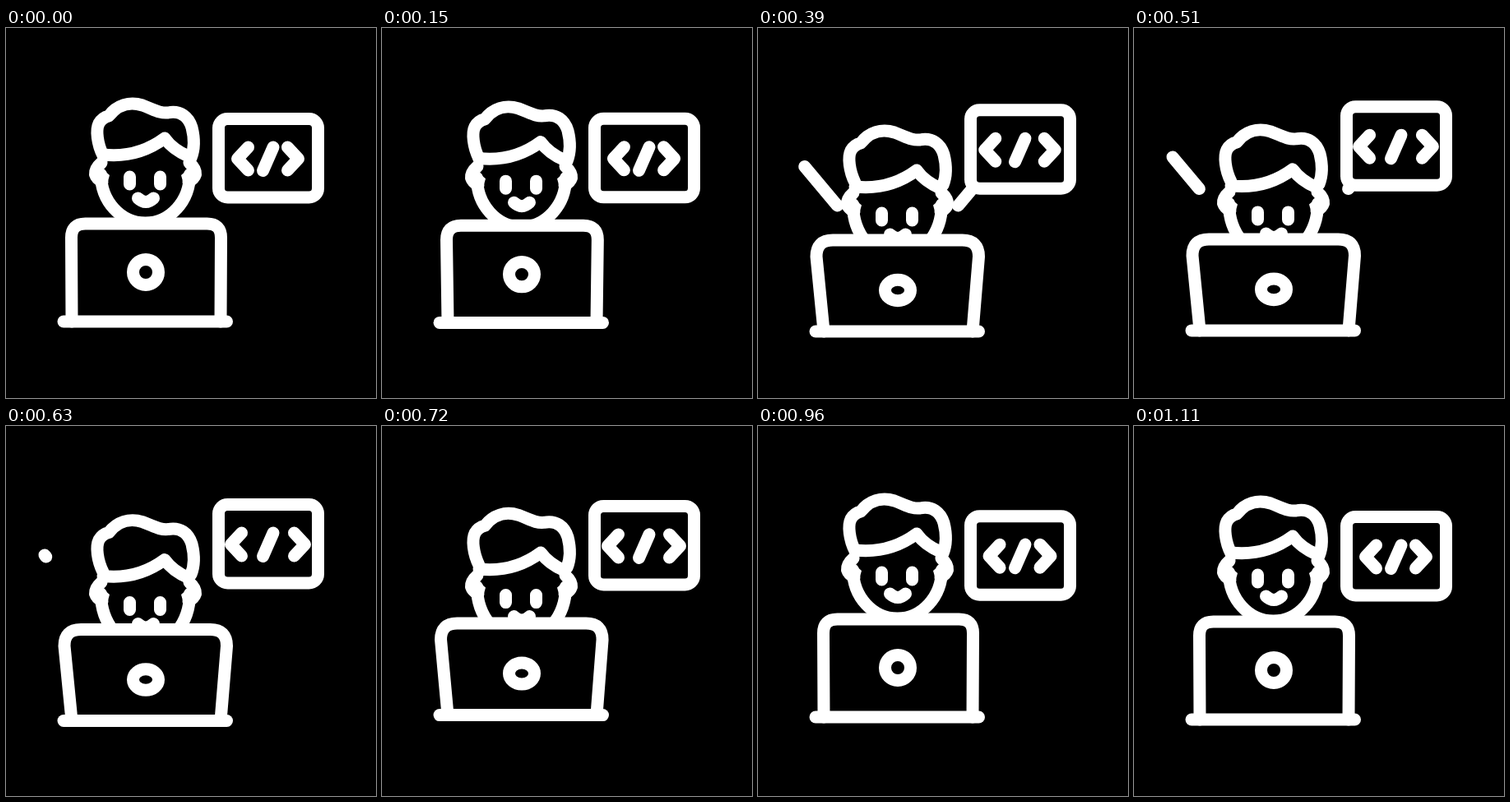
Animation, 450 px wide and 450 px high, one loop 1.38 s. Source, as an HTML page with a canvas:

```html
<!DOCTYPE html>
<html lang="en">
<head>
<meta charset="utf-8">
<title>Coder</title>
<style>
  html, body { margin: 0; height: 100%; overflow: hidden; background: #000; }
  canvas { display: block; }
</style>
</head>
<body>
<canvas id="stage" width="450" height="450"></canvas>
<script>
const LOOP = 1380, STEP = 30, AXIS = 169.5;
const ctx = document.getElementById('stage').getContext('2d');

const hair = new Path2D('M118 155C111 141 109 124 113 116Q117 109 125 107C135 94 150 89 166 94C180 99 186 104 197 103C212 100 222 108 226 121C230 137 229 148 225 158');
const fringe = new Path2D('M118 154C145 157 170 151 193 134Q203 148 222 156');
const ear = new Path2D('M116 164Q108 171 108.5 178Q110 183 117 187');
const earTip = new Path2D('M110 164H120L119 173L126 179L123 190L110 187Z');
const eyes = new Path2D('M150.5 181V190M187.5 181V190');
const mouth = new Path2D('M160.5 207Q170 216 179.5 207');

// Cosine ease from 0 to 1 between two times
function ease(t, from, to) {
  const p = Math.min(1, Math.max(0, (t - from) / (to - from)));
  return (1 - Math.cos(Math.PI * p)) / 2;
}

function at(x, y, draw) {
  ctx.save();
  ctx.translate(x, y);
  draw();
  ctx.restore();
}

function mirrored(axis, draw) {
  draw();
  ctx.save();
  ctx.translate(2 * axis, 0);
  ctx.scale(-1, 1);
  draw();
  ctx.restore();
}

function line(...points) {
  ctx.beginPath();
  for (let i = 0; i < points.length; i += 2) ctx.lineTo(points[i], points[i + 1]);
  ctx.stroke();
}

function sparks(t) {
  const head = ease(t, 220, 460), tail = ease(t, 410, 660);
  if (head <= tail) return;
  const x = k => 96.5 - 49.5 * k, y = k => 216 - 59 * k;
  mirrored(170, () => line(x(tail), y(tail), x(head), y(head)));
}

function person(lift, squash) {
  at(0, lift + 21 * squash, () => {
    ctx.stroke(hair);
    at(0, 6 * squash, () => ctx.stroke(fringe));
    at(0, 3.5 * squash, () => {
      ctx.beginPath();
      ctx.ellipse(AXIS, 178, 54, 59 + 6 * squash, 0, 0, Math.PI);
      ctx.stroke();
      mirrored(AXIS, () => {
        ctx.stroke(ear);
        ctx.fill(earTip);
      });
    });
    at(0, 11 * squash, () => {
      ctx.stroke(eyes);
      ctx.stroke(mouth);
    });
  });
}

function laptop(lift, squash) {
  const base = 357 + lift, top = base - 119 + 8 * squash;
  const left = 79.5 - 8.5 * squash, right = 261.5 + 7 * squash;
  const corner = 17 + 3 * squash;
  const lid = new Path2D(`M80 ${base}L${left} ${top + corner}Q${left} ${top} ${left + corner} ${top}` +
    `H${right - corner}Q${right} ${top} ${right} ${top + corner}L261 ${base}`);
  ctx.fillStyle = '#000';
  ctx.fill(lid);
  ctx.fillStyle = '#fff';
  ctx.stroke(lid);
  line(70, base, 268.5, base);
  ctx.beginPath();
  ctx.ellipse(170, base - 60 + 10 * squash, 15.5, 15.5 - 2.7 * squash, 0, 0, 2 * Math.PI);
  ctx.stroke();
}

function codeWindow(rise) {
  const spread = 8 * rise;
  at(0, -15 * rise, () => {
    ctx.beginPath();
    ctx.roundRect(258.5, 110.5, 121, 95.5, 11);
    ctx.fillStyle = '#000';
    ctx.fill();
    ctx.fillStyle = '#fff';
    ctx.stroke();
    line(325, 145, 312.5, 173.5);
    mirrored(318.5, () => line(294.5 - spread, 145, 281.5 - spread, 159, 294.5 - spread, 173));
  });
}

function frame(now) {
  const t = Math.floor(now % LOOP / STEP) * STEP;
  const squash = ease(t, 90, 360) - ease(t, 680, 930);
  const lift = 12 * ease(t, 90, 360) - 19 * ease(t, 460, 780) + 7 * ease(t, 780, 1110);
  const rise = ease(t, 120, 540) - ease(t, 630, 1020);

  ctx.fillStyle = '#000';
  ctx.fillRect(0, 0, 450, 450);
  ctx.fillStyle = ctx.strokeStyle = '#fff';
  ctx.lineWidth = 15;
  ctx.lineCap = ctx.lineJoin = 'round';
  sparks(t);
  person(lift, squash);
  laptop(lift, squash);
  codeWindow(rise);
}

const start = performance.now();
function tick() {
  frame(performance.now() - start);
  requestAnimationFrame(tick);
}
tick();
</script>
</body>
</html>
```
